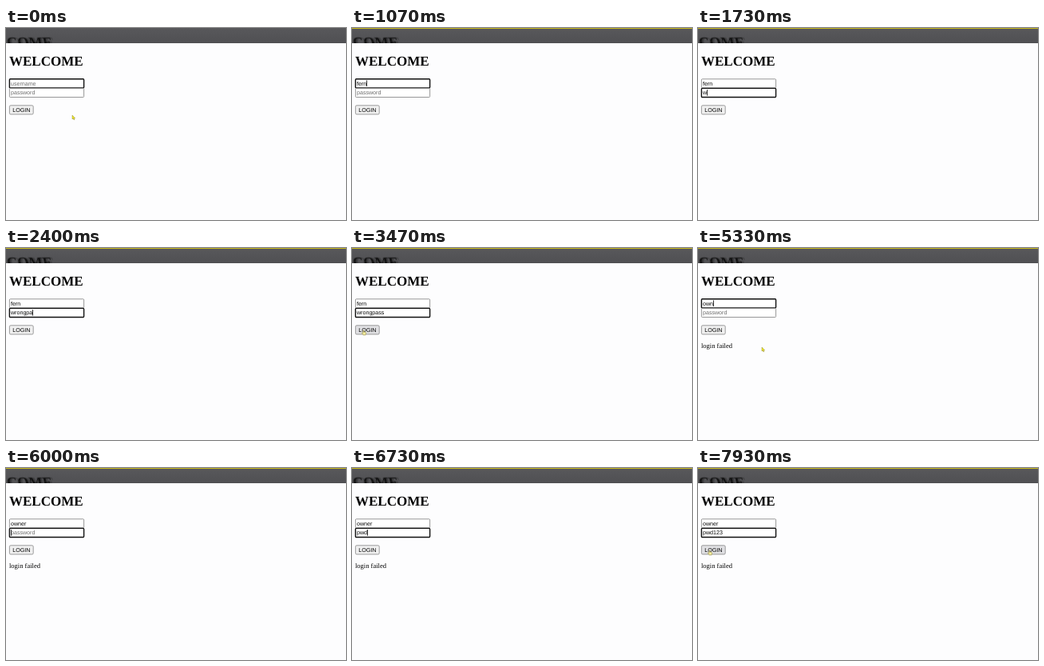
Animation, 426 px wide and 240 px high, one loop 8000 ms. Source, as an HTML page:

```html
<!DOCTYPE html>
<html lang="en">
<head>
<meta charset="utf-8">
<title>Login form</title>
<style>
  html, body { margin: 0; width: 100%; height: 100%; overflow: hidden; background: #fdfdfe; }
  svg { display: block; width: 100vw; height: 100vh; }
  text { text-rendering: geometricPrecision; }
  .serif { font-family: "Liberation Serif", serif; }
  .sans { font: 7.1px "Liberation Sans", sans-serif; }
  .title { font-size: 17px; font-weight: bold; }
  .ghost { font-size: 18.3px; font-weight: bold; filter: blur(.4px); }
</style>
</head>
<body>
<svg viewBox="0 0 426 240">
  <defs>
    <linearGradient id="shade" x2="0" y2="1">
      <stop stop-color="#58585b"/><stop offset="1" stop-color="#505053"/>
    </linearGradient>
    <clipPath id="barClip"><path d="M0 0H426V19H0Z"/></clipPath>
  </defs>
  <rect width="426" height="240" fill="#fdfdfe"/>
  <g clip-path="url(#barClip)">
    <rect width="426" height="19" fill="url(#shade)"/>
    <g class="serif ghost" fill="#0c0c0c" transform="translate(0 24) skewX(12)">
      <text x="5" opacity=".3">COME</text>
      <text x="2.5" opacity=".9">COME</text>
    </g>
    <rect id="topLine" width="426" height="1" fill="#c9b91c"/>
  </g>
  <text class="serif title" x="4" y="46.5">WELCOME</text>

  <g class="sans">
    <rect id="userBox" x="4.4" y="63.8" width="93.2" height="11.1" rx="1"/>
    <rect id="passBox" x="4.4" y="75.4" width="93.2" height="11.1" rx="1"/>
    <text id="userText" x="6" y="71.7"></text>
    <text id="passText" x="6" y="83.2"></text>
    <rect id="caret" width=".8" height="7.6"/>
    <rect id="button" x="4.4" y="96.8" width="29.8" height="11.1" rx="1.5" stroke="#767676" stroke-width=".7"/>
    <text x="8.2" y="104.8">LOGIN</text>
  </g>
  <text id="message" class="serif" x="4" y="124.8" font-size="8.5">login failed</text>

  <g id="pointer" stroke-linejoin="round">
    <path id="arrow" d="M0 0V4.9L1.2 4 2 5.8 2.9 5.4 2.1 3.7H3.6Z" fill="#f4ec22" stroke="#77701f" stroke-width=".4"/>
    <path id="beam" d="M-1.6 -3.5H1.6M0 -3.5V3.5M-1.6 3.5H1.6" fill="none" stroke="#77762a" stroke-width=".8"/>
    <path id="hand" d="M0 0V3.3L-1.3 2.6 -1.6 3.2 0 5.8H3L3.7 2.9 3 2.3 1 1.9V0Z" fill="#f4eca0" stroke="#8b8338" stroke-width=".5"/>
  </g>
</svg>
<script>
const LOOP = 8000, STEP = 200 / 3;
const $ = id => document.getElementById(id);

// Each run of keystrokes: field, text, time of first key, time between keys.
const runs = [
  { field: 'user', text: 'fern', start: 460, gap: 150 },
  { field: 'pass', text: 'wrongpass', start: 1660, gap: 120 },
  { field: 'user', text: 'owner', start: 4990, gap: 150 },
  { field: 'pass', text: 'pwd123', start: 6320, gap: 180 }
];
const SUBMIT = 3600;

// Moments at which a field takes focus (null: page reloaded).
const focusChanges = [
  [-600, 'user'], [1400, 'pass'], [SUBMIT, null], [4600, 'user'], [6000, 'pass']
];

// Pointer paths: [from, to, x0, y0, x1, y1]; it hides between them.
const moves = [
  [0, 450, 83, 109, 83, 109],
  [2850, 3350, 83, 109, 14, 103],
  [3350, 3900, 14, 103, 14, 103],
  [3900, 4400, 14, 103, 75, 73],
  [4400, 4650, 75, 73, 75, 73],
  [4650, 4950, 75, 73, 80, 124],
  [4950, 5450, 80, 124, 80, 124],
  [7420, 7860, 80, 124, 14, 103],
  [7860, LOOP, 14, 103, 14, 103]
];

const show = (id, on) => $(id).setAttribute('visibility', on ? 'visible' : 'hidden');
const set = (id, values) => {
  for (const key in values) $(id).setAttribute(key, values[key]);
};
const ease = p => p * p * (3 - 2 * p);
const inside = (x, y, left, top, right, bottom) =>
  x >= left && x <= right && y >= top && y <= bottom;

function typed(field, t) {
  const run = runs.find(r => r.field === field && r.start > SUBMIT === t >= SUBMIT);
  const count = Math.floor((t - run.start) / run.gap) + 1;
  return run.text.slice(0, Math.max(0, count));
}

function drawField(field, t, focused) {
  const value = typed(field, t), label = $(field + 'Text');
  label.textContent = value || (field === 'user' ? 'username' : 'password');
  label.setAttribute('fill', value ? '#080808' : '#6c6c6c');
  set(field + 'Box', {
    fill: '#fff',
    stroke: focused ? '#101010' : '#767676',
    'stroke-width': focused ? 1.4 : .75
  });
  return value ? label.getComputedTextLength() : 0;
}

function drawCaret(t, field, focusTime, width) {
  let lastInput = focusTime;
  for (const { text, start, gap } of runs) {
    if (t >= start) {
      const index = Math.min(text.length - 1, Math.floor((t - start) / gap));
      lastInput = Math.max(lastInput, start + index * gap);
    }
  }
  show('caret', field && (t - lastInput) % 1000 < 500);
  set('caret', { x: 6 + width, y: field === 'pass' ? 77 : 65.4 });
}

function drawPointer(t) {
  const move = moves.find(m => t >= m[0] && t < m[1]);
  let shape = null;
  if (move) {
    const [from, to, x0, y0, x1, y1] = move;
    const p = ease((t - from) / (to - from));
    const x = x0 + (x1 - x0) * p, y = y0 + (y1 - y0) * p;
    shape = inside(x, y, 4, 97, 34, 108) ? 'hand'
      : inside(x, y, 4, 64, 98, 87) ? 'beam' : 'arrow';
    set('pointer', { transform: `translate(${x} ${y})` });
  }
  for (const id of ['arrow', 'beam', 'hand']) show(id, id === shape);
  set('button', { fill: shape === 'hand' ? '#e0e0e3' : '#f0f0f0' });
}

function draw(now) {
  const t = Math.floor(((now % LOOP) + 5) / STEP) * STEP % LOOP;
  const [focusTime, focus] = focusChanges.filter(c => c[0] <= t).pop();
  const widths = {
    user: drawField('user', t, focus === 'user'),
    pass: drawField('pass', t, focus === 'pass')
  };
  drawCaret(t, focus, focusTime, widths[focus] || 0);
  drawPointer(t);
  show('message', t >= SUBMIT);
  show('topLine', t >= STEP);
  requestAnimationFrame(draw);
}
requestAnimationFrame(draw);
</script>
</body>
</html>
```
